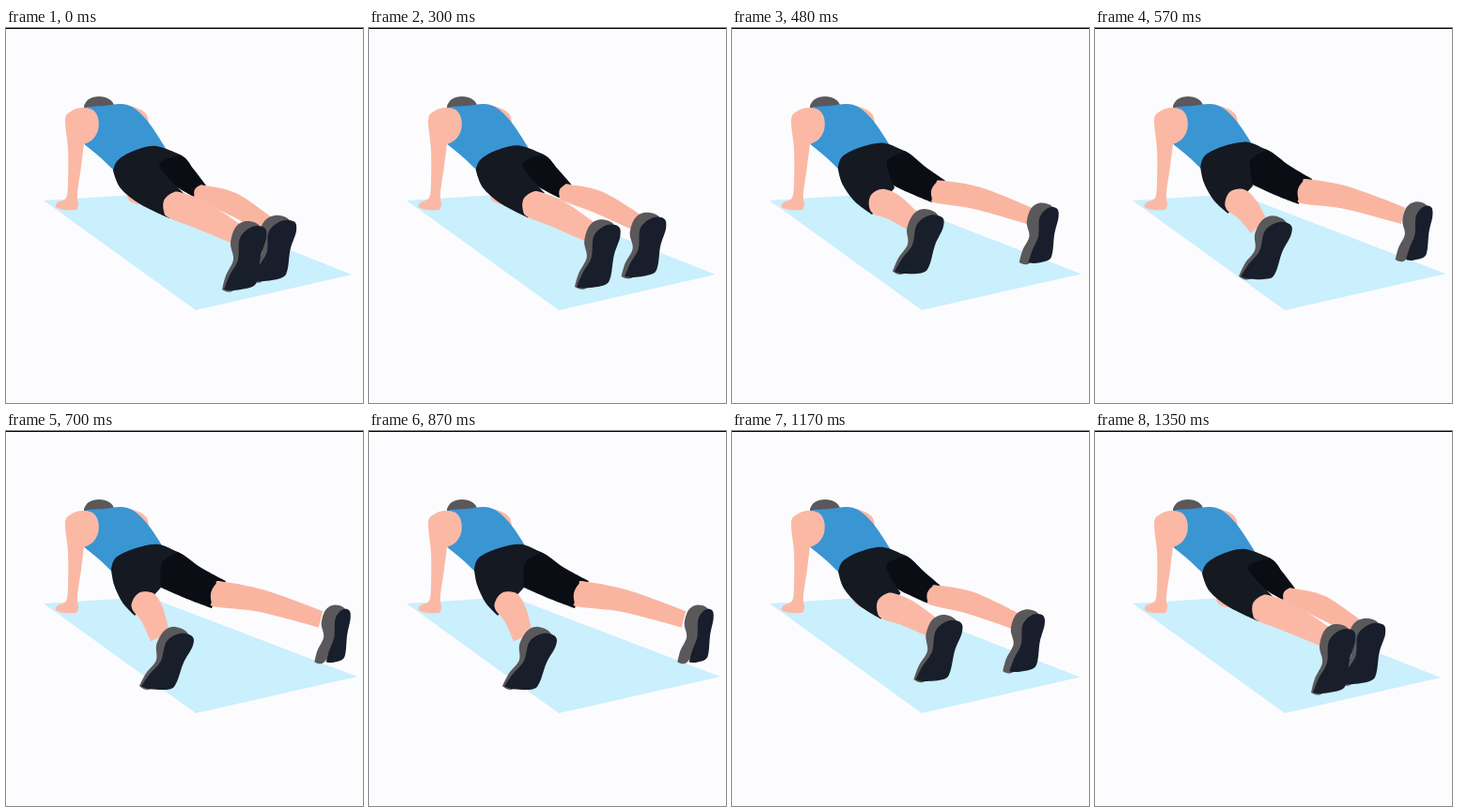
These frames come from a looping animation (380 by 400 pixels, 1.4 s). An HTML page with a canvas:

```html
<!DOCTYPE html>
<html lang="en">
<head>
<meta charset="utf-8">
<title>Plank jack</title>
<style>
html, body { margin: 0; width: 100%; height: 100%; overflow: hidden; background: #fcfcfe; }
canvas { display: block; width: 380px; height: 400px; }
</style>
</head>
<body>
<canvas id="stage" width="380" height="400"></canvas>
<script>
const ctx = document.getElementById('stage').getContext('2d');
const { PI, sin, hypot, floor, min } = Math;
const LOOP = 1400;
const SKIN = '#fbb9a5', GRAY = '#5a585b';

const mix = (a, b, u) => a + (b - a) * u;

// "x,y" is a smooth point, "x,y!" a corner
const parse = text => text.split(' ').map(t => {
  const [x, y] = t.replace('!', '').split(',').map(Number);
  return { x, y, corner: t.endsWith('!') };
});

const morph = (from, to, u) => from.map((p, i) => (
  { x: mix(p.x, to[i].x, u), y: mix(p.y, to[i].y, u), corner: p.corner }));

const head = parse('83,85 88,76 99,73 110,76 115,84 108,94 90,94');
const farShoulder = parse('132,83! 143,87 150,93 152,102! 140,100!');
const farHand = parse('129,177! 131,184 141,188 147,184! 140,175!');
const vest = parse('86,84! 104,83 122,81 134,84 146,94 157,108 171,130! 160,150! 118,156! 114,151! 98,136 82,123!');
const arm = parse('63,98 69,89 80,85 92,87 98,96 98,109 92,119 83,124! 80,148 76,176 77,188 75,194! 62,194 53,191 55,186 64,181 66,164 66,130');

const nearShorts = [
  '114,152! 122,171 143,188 174,203! 190,177! 163,146 187,136! 160,126 136,131 119,141',
  '112,148! 115,164 124,183 137,197! 165,167! 166,141 183,130! 163,121 138,125 117,135'
].map(parse);
const farShorts = [
  '160,130! 187,136 200,151 213,168! 200,180! 182,170 150,150!',
  '160,126! 183,129 208,146 234,160! 219,189! 190,178 150,160!'
].map(parse);

const shoeUpper = parse('-15,-15 -10,-32 1,-39 15,-35 19,-20 5,10 -12,35 -24,34! -20,19 -12,2');
const shoeSole = parse('-5,-21 8,-33 21,-32 23,-21 17,-1 14,22 8,31 -12,35 -22,34! -16,19 -7,2');

// Closed Catmull-Rom curve; tangents vanish at corners
function fill(points, color) {
  const n = points.length, at = i => points[(i + n) % n];
  const tangent = i => at(i).corner ? [0, 0]
    : [(at(i + 1).x - at(i - 1).x) / 6, (at(i + 1).y - at(i - 1).y) / 6];
  ctx.beginPath();
  ctx.moveTo(points[0].x, points[0].y);
  for (let i = 0; i < n; i++) {
    const a = at(i), b = at(i + 1), s = tangent(i), e = tangent(i + 1);
    ctx.bezierCurveTo(a.x + s[0], a.y + s[1], b.x - e[0], b.y - e[1], b.x, b.y);
  }
  ctx.fillStyle = color;
  ctx.fill();
}

// Tapered calf with a rounded knee; "bend" pushes its middle sideways
function calf(knee, ankle, [r0, r1, r2], cap, bend, color) {
  const dx = ankle.x - knee.x, dy = ankle.y - knee.y, len = hypot(dx, dy);
  const at = (along, side) => ({
    x: knee.x + (dx * along + dy * side) / len,
    y: knee.y + (dy * along - dx * side) / len
  });
  const mid = len * .42;
  fill([
    at(-cap, 0), at(-cap * .65, r0 * .7), at(0, r0), at(mid, bend + r1),
    { ...at(len, r2), corner: true }, { ...at(len, -r2), corner: true },
    at(mid, bend - r1), at(0, -r0), at(-cap * .65, -r0 * .7)
  ], color);
}

// "turn" shows more of the side and less of the sole
function shoe(foot, angle, sx, sy, turn, color) {
  ctx.save();
  ctx.translate(foot.x, foot.y);
  ctx.rotate(angle);
  ctx.scale(sx, sy);
  fill(shoeUpper, GRAY);
  fill(shoeSole.map(p => ({ ...p, x: mix(p.x, 22, turn) })), color);
  ctx.restore();
}

function farLeg(u) {
  const foot = { x: mix(285, 348, u), y: 237 - 19 * sin(PI / 2 * u) };
  const knee = { x: mix(208, 226, u), y: mix(176, 174, u) };
  const ankle = { x: foot.x + mix(-5, -13, u), y: foot.y + mix(-26, -17, u) };
  fill(morph(...farShorts, u), '#0a0d13');
  calf(knee, ankle, [mix(9, 14, u), 12, 9], 8, 4, '#fab5a1');
  shoe(foot, 0, mix(1.04, .82, u), mix(.95, .83, u), .3 * u, '#191e2c');
}

function nearLeg(u) {
  const foot = { x: mix(254, 172, u), y: 245 - 15 * sin(PI * u ** 1.5) };
  const knee = { x: mix(180, 148, u), y: mix(189, 184, u) };
  const ankle = { x: foot.x - 8, y: foot.y - 25 };
  fill(morph(...nearShorts, u), '#141922');
  calf(knee, ankle, [15, mix(15, 13, u), 11], 13, 2, SKIN);
  shoe(foot, .2 * u, 1, mix(1, .95, u), 0, '#191f2a');
}

function draw(u) {
  ctx.fillStyle = '#fcfcfe';
  ctx.fillRect(0, 0, 380, 400);
  fill(parse(`40,184! 152,177! ${368 + 6 * u},${263 - u}! 202,301!`), '#caeffd');

  fill(farHand, SKIN);
  fill(head, GRAY);
  fill(farShoulder, SKIN);
  fill(vest, '#3a95d3');
  fill(arm, SKIN);
  farLeg(u);
  nearLeg(u);

  ctx.fillStyle = '#000';
  ctx.fillRect(0, 0, 380, 1);
}

// Stepped progress 0..1 that begins with its first step at "from"
const steps = (t, from, gap, count) =>
  t < from ? 0 : min(1, (floor((t - from) / gap + .1) + 1) / count);

function spread(t) {
  const out = sin(PI / 2 * steps(t, 300, 44.5, 10) ** 1.1);
  const back = sin(PI / 2 * steps(t, 1000, 43.3, 9)) ** 2;
  return out * (1 - back);
}

const start = performance.now();
function tick() {
  draw(spread((performance.now() - start) % LOOP));
  requestAnimationFrame(tick);
}
tick();
</script>
</body>
</html>
```
